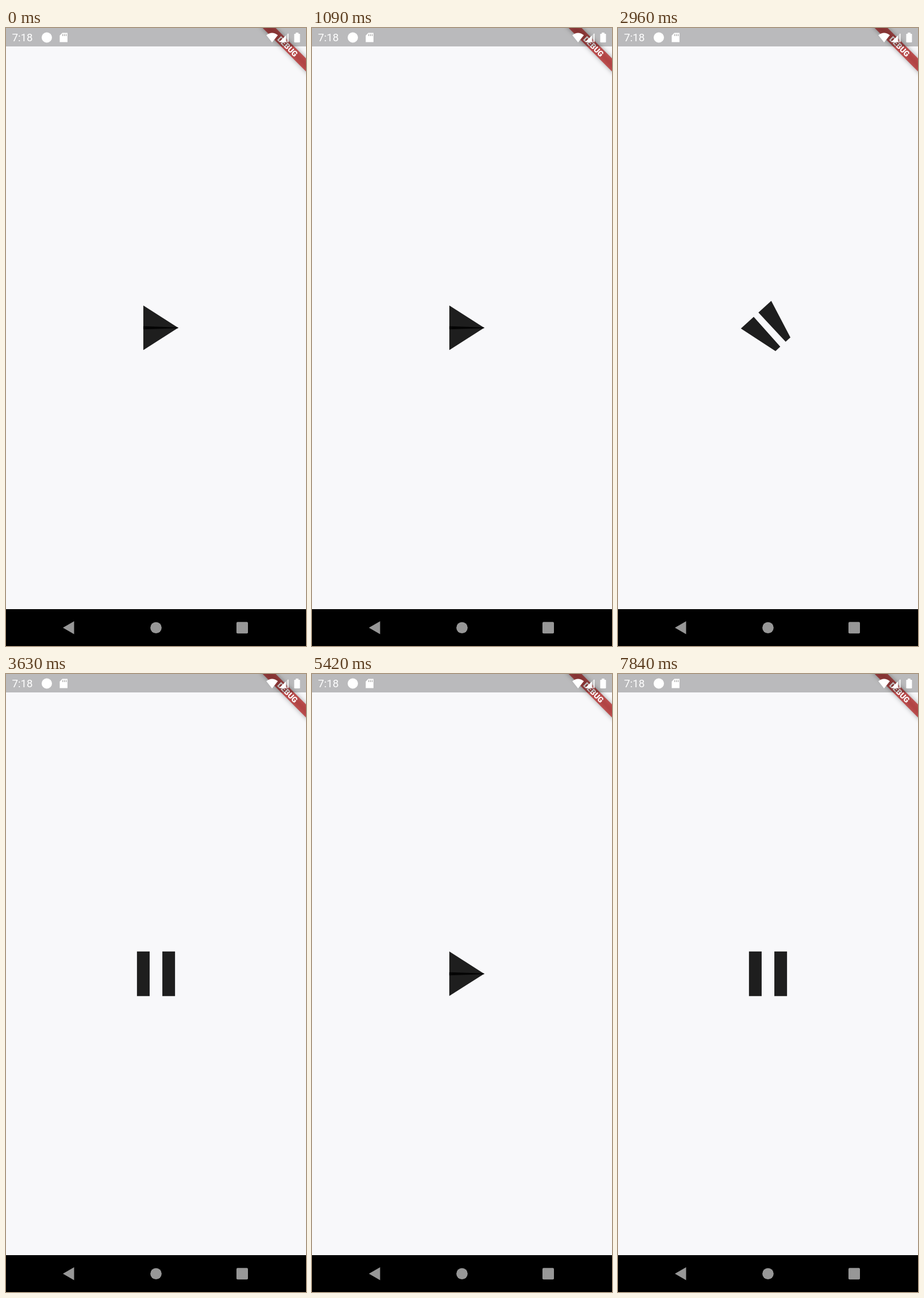
These frames come from a looping animation (522x1073 px, 8 s). An HTML page with a canvas:

```html
<!DOCTYPE html>
<html lang="en">
<head>
<meta charset="utf-8">
<title>Play / pause icon</title>
<style>
  html, body { margin: 0; width: 100%; height: 100%; overflow: hidden; background: #f8f8fa; }
  canvas { display: block; }
</style>
</head>
<body>
<canvas id="stage" width="522" height="1073"></canvas>
<script>
const W = 522, H = 1073, LOOP = 8000;
const BAR = 32, NAV = 1009;
const ctx = document.getElementById('stage').getContext('2d');

// Morphs between play (0) and pause (1); the screen stalls during the holds.
const MORPH_MS = 900;
const MORPHS = [
  { start: 2634, to: 1 },
  { start: 4540, to: 0 },
  { start: 6446, to: 1 }
];
const HOLDS = [[2960, 3170], [4710, 4790], [6500, 6670]];

const lerp = (a, b, t) => a + (b - a) * t;
const clamp = v => Math.min(1, Math.max(0, v));

// Cubic bezier (0.4, 0, 0.2, 1), solved by bisection.
function ease(x) {
  let lo = 0, hi = 1;
  for (let i = 0; i < 24; i++) {
    const s = (lo + hi) / 2, r = 1 - s;
    const bx = 1.2 * s * r * r + 0.6 * s * s * r + s * s * s;
    if (bx < x) lo = s; else hi = s;
  }
  return lo * lo * (3 - 2 * lo);
}

function progressAt(time) {
  const hold = HOLDS.find(([from, to]) => time >= from && time < to);
  const t = hold ? hold[0] : time;
  let p = 0;
  for (const { start, to } of MORPHS) {
    if (t < start) break;
    const x = clamp((t - start) / MORPH_MS);
    p = to ? ease(x) : ease(1 - x);
  }
  return p;
}

function polygon(points, color) {
  ctx.beginPath();
  points.forEach(([x, y]) => ctx.lineTo(x, y));
  ctx.closePath();
  ctx.fillStyle = color;
  ctx.fill();
}

function disc(x, y, r, color) {
  ctx.beginPath();
  ctx.arc(x, y, r, 0, Math.PI * 2);
  ctx.fillStyle = color;
  ctx.fill();
}

function box(x, y, w, h, r, color) {
  ctx.beginPath();
  ctx.roundRect(x, y, w, h, r);
  ctx.fillStyle = color;
  ctx.fill();
}

function drawIcon(p) {
  const back = lerp(-8, -14, p), front = 14;
  const outerBack = lerp(14, 12, p), outerFront = 12 * p;
  const spread = p ** 0.8;
  const innerBack = lerp(-1, 4, spread), innerFront = lerp(-0.3, 4, spread);
  ctx.save();
  ctx.translate(261, 520.5);
  ctx.rotate(p * Math.PI / 2);
  ctx.scale(2.76, 2.76);
  for (const side of [-1, 1]) {
    polygon([
      [back, side * outerBack], [back, side * innerBack],
      [front, side * innerFront], [front, side * outerFront]
    ], 'rgba(0,0,0,0.88)');
  }
  ctx.restore();
}

function drawRibbon() {
  ctx.save();
  ctx.translate(W, 0);
  ctx.rotate(Math.PI / 4);
  ctx.save();
  ctx.shadowColor = 'rgba(0,0,0,0.5)';
  ctx.shadowBlur = 9;
  ctx.fillStyle = 'rgba(183,28,28,0.7)';
  ctx.fillRect(-60, 37.3, 120, 16);
  ctx.restore();
  ctx.font = '900 13.6px Roboto, sans-serif';
  ctx.textAlign = 'center';
  ctx.textBaseline = 'alphabetic';
  ctx.fillStyle = '#fff';
  ctx.fillText('DEBUG', 0, 50.2);
  ctx.restore();
}

function drawStatusBar() {
  ctx.fillStyle = 'rgba(0,0,0,0.25)';
  ctx.fillRect(0, 0, W, BAR);

  ctx.font = '18.7px Roboto, sans-serif';
  ctx.textAlign = 'left';
  ctx.textBaseline = 'alphabetic';
  ctx.fillStyle = '#fff';
  ctx.fillText('7:18', 10.5, 23.3);

  disc(71, 16.5, 9, '#fff');

  // Memory card
  polygon([[98, 8.5], [107, 8.5], [107, 24.5], [93.5, 24.5], [93.5, 13]], '#fff');
  for (const x of [98, 101, 104]) box(x, 10.5, 1.4, 3.5, 0, '#b0b0b0');

  // Wi-Fi fan
  ctx.beginPath();
  ctx.moveTo(463, 25);
  ctx.lineTo(453, 12.5);
  ctx.quadraticCurveTo(463, 4.5, 473, 12.5);
  ctx.closePath();
  ctx.fillStyle = '#fff';
  ctx.fill();

  // Signal wedge
  polygon([[475.5, 24.5], [491.5, 8.5], [491.5, 24.5]], 'rgba(255,255,255,0.35)');
  polygon([[475.5, 24.5], [487, 13], [487, 24.5]], '#fff');
  box(490, 10, 1.5, 14.5, 0, '#fff');

  // Battery
  box(501.5, 10, 10, 15, 1.3, '#fff');
  box(504.2, 8, 4.6, 3, 0, '#fff');
}

function drawNavBar() {
  const gray = '#979797';
  ctx.fillStyle = '#000';
  ctx.fillRect(0, NAV, W, H - NAV);
  polygon([[99, 1041.3], [118.5, 1030], [118.5, 1052.5]], gray);
  disc(261, 1041.2, 9.8, gray);
  box(401, 1031.3, 20, 20, 2, gray);
}

function draw(time) {
  ctx.fillStyle = '#f8f8fa';
  ctx.fillRect(0, 0, W, H);
  drawIcon(progressAt(time));
  drawRibbon();
  drawStatusBar();
  drawNavBar();
}

const begin = performance.now();
function tick() {
  draw((performance.now() - begin) % LOOP);
  requestAnimationFrame(tick);
}
tick();
</script>
</body>
</html>
```
